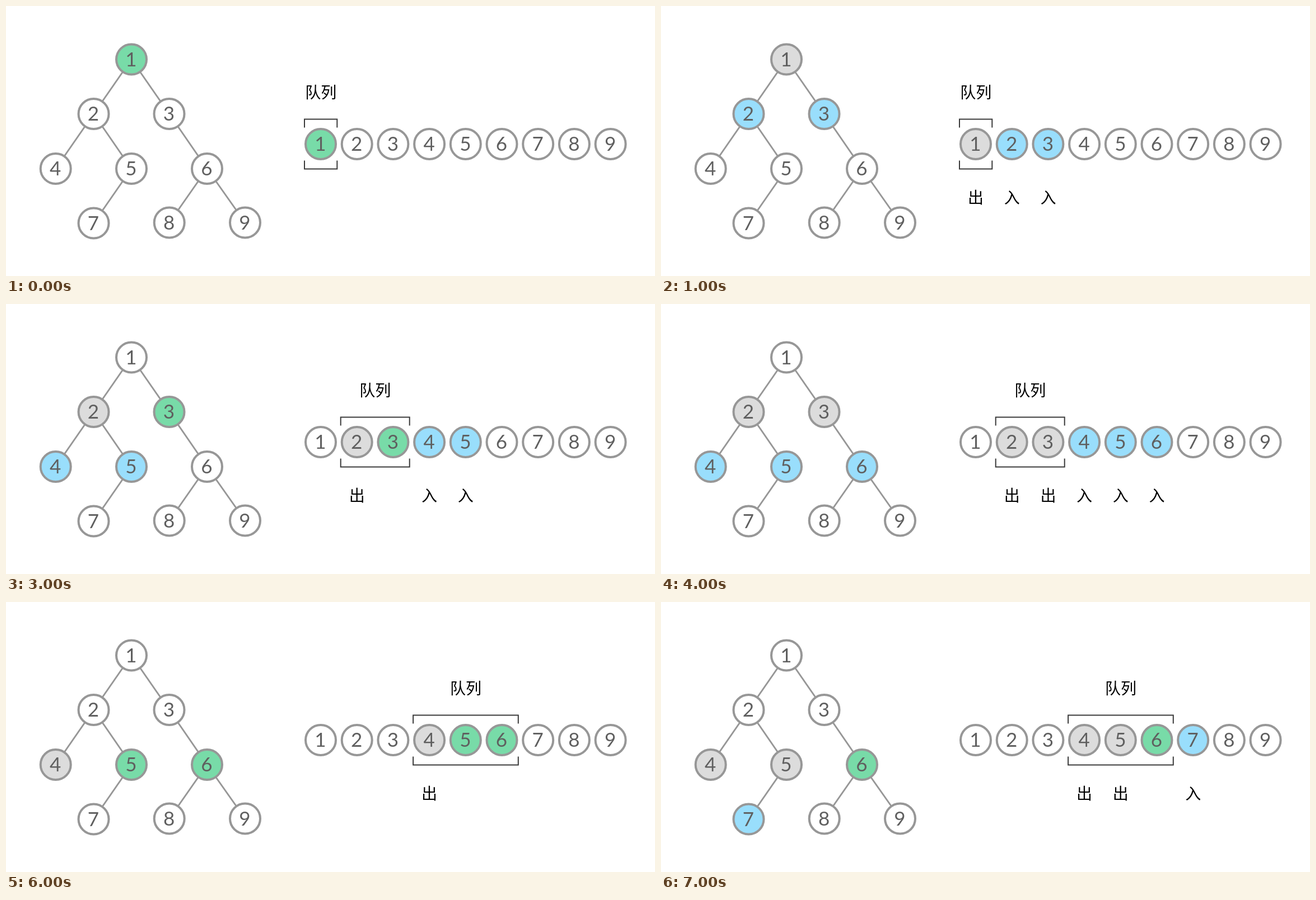
Animation of 1159 by 483 pixels, one loop 8000 ms. Source, as an HTML page with a canvas:

```html
<!DOCTYPE html>
<html lang="zh-CN">
<head>
<meta charset="utf-8">
<title>队列</title>
<style>
html, body { margin: 0; width: 100%; height: 100%; overflow: hidden; background: #fff; }
canvas { display: block; width: 1159px; height: 483px; }
</style>
</head>
<body>
<canvas id="stage"></canvas>
<script>
const W = 1159, H = 483, STEP = 1000;
const canvas = document.getElementById('stage');
const ctx = canvas.getContext('2d');
const ratio = window.devicePixelRatio || 1;
canvas.width = W * ratio;
canvas.height = H * ratio;

const RADIUS = 27, QUEUE_Y = 247;
const FILL = { active: '#78dba8', out: '#dcdcdc', in: '#99defc' };
const CJK = '28px "Noto Sans CJK SC", "Noto Sans CJK", sans-serif';

// Tree nodes 1 to 9, and the parent-child links between them.
const nodes = [
  [224, 95.5], [156.5, 193], [291.5, 193],
  [88.7, 291], [224, 291], [359, 291],
  [156.5, 388.5], [291.7, 387.5], [427, 387.5]
];
const edges = [[1, 2], [1, 3], [2, 4], [2, 5], [3, 6], [5, 7], [6, 8], [6, 9]];

// Each step: bracketed range, then the nodes that are active, leaving and entering.
const steps = [
  { range: [1, 1], active: [1], out: [], in: [] },
  { range: [1, 1], active: [], out: [1], in: [2, 3] },
  { range: [2, 3], active: [2, 3], out: [], in: [] },
  { range: [2, 3], active: [3], out: [2], in: [4, 5] },
  { range: [2, 3], active: [], out: [2, 3], in: [4, 5, 6] },
  { range: [4, 6], active: [4, 5, 6], out: [], in: [] },
  { range: [4, 6], active: [5, 6], out: [4], in: [] },
  { range: [4, 6], active: [6], out: [4, 5], in: [7] }
];

const queueX = n => 562 + 64.7 * (n - 1);

function path(points, color, width) {
  ctx.beginPath();
  points.forEach(([x, y]) => ctx.lineTo(x, y));
  ctx.strokeStyle = color;
  ctx.lineWidth = width;
  ctx.stroke();
}

function label(text, x, y, font, color) {
  ctx.font = font;
  ctx.fillStyle = color;
  ctx.fillText(text, x, y);
}

function disc(n, x, y, fill) {
  ctx.beginPath();
  ctx.arc(x, y, RADIUS, 0, Math.PI * 2);
  ctx.fillStyle = fill;
  ctx.fill();
  ctx.strokeStyle = '#979797';
  ctx.lineWidth = 4;
  ctx.stroke();
  label(n, x - 0.5, y + 12, '35px Lato, sans-serif', '#5f5f5f');
}

function bracket([first, last]) {
  const left = queueX(first) - 29, right = queueX(last) + 29.3;
  for (const side of [-1, 1]) {
    const outer = QUEUE_Y + side * 44.5, inner = QUEUE_Y + side * 29.5;
    path([[left, inner], [left, outer], [right, outer], [right, inner]], '#3a3a3a', 2);
  }
  label('队列', (left + right) / 2, 165, CJK, '#000');
}

function draw(step) {
  const state = n => Object.keys(FILL).find(key => step[key].includes(n));
  ctx.setTransform(ratio, 0, 0, ratio, 0, 0);
  ctx.fillStyle = '#fff';
  ctx.fillRect(0, 0, W, H);
  ctx.textAlign = 'center';

  edges.forEach(([a, b]) => path([nodes[a - 1], nodes[b - 1]], '#979797', 3));
  nodes.forEach(([x, y], i) => {
    const n = i + 1, fill = FILL[state(n)] || '#fff';
    disc(n, x, y, fill);
    disc(n, queueX(n), QUEUE_Y, fill);
  });
  bracket(step.range);
  step.out.forEach(n => label('出', queueX(n), 353, CJK, '#000'));
  step.in.forEach(n => label('入', queueX(n), 353, CJK, '#000'));
}

const start = performance.now();
function tick() {
  const time = performance.now() - start;
  draw(steps[Math.floor(time / STEP) % steps.length]);
  requestAnimationFrame(tick);
}
tick();
</script>
</body>
</html>
```
